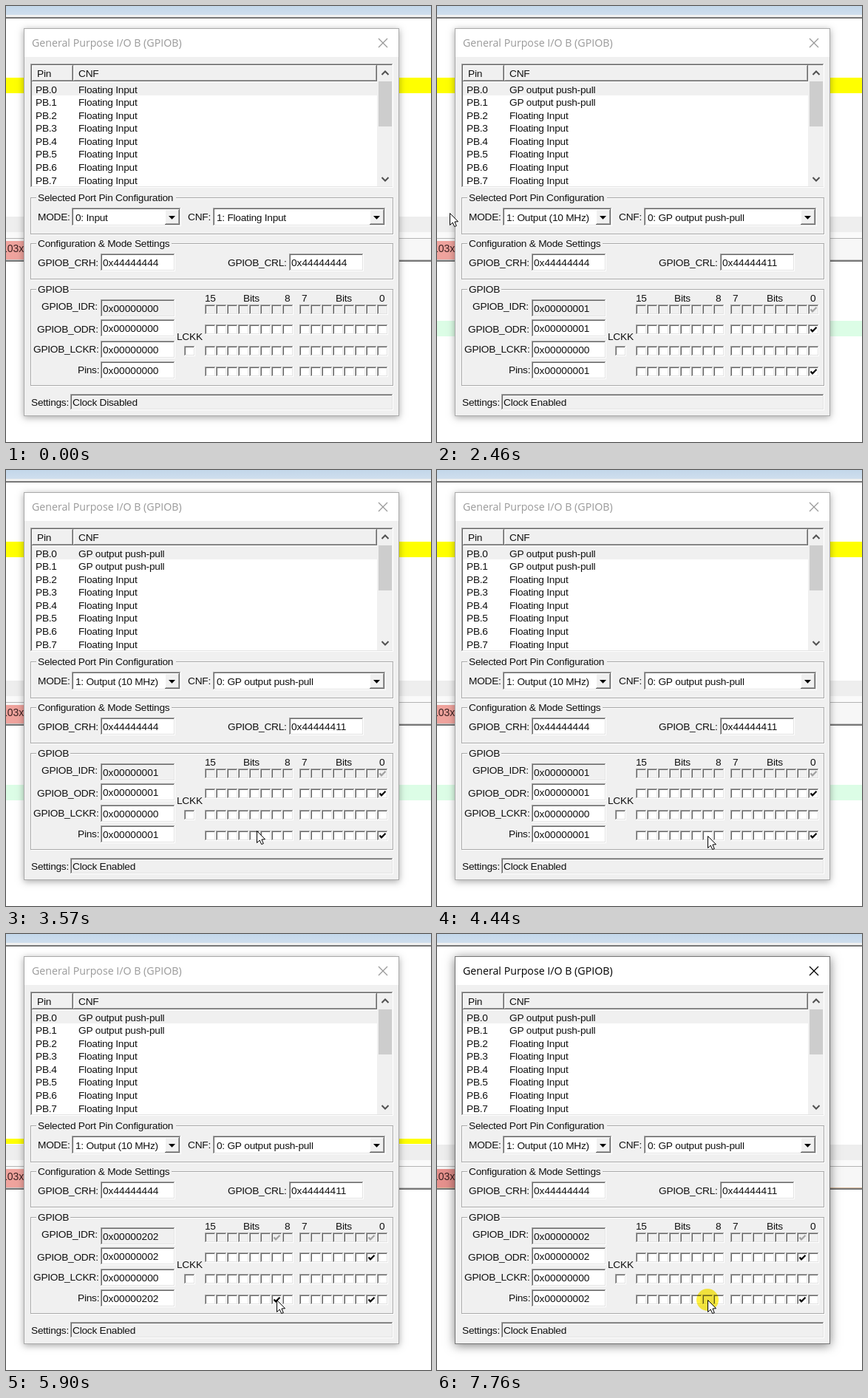
These frames come from a looping animation (575x590 px, 8 s). An HTML page with a canvas:

```html
<!DOCTYPE html>
<html lang="en">
<head>
<meta charset="utf-8">
<title>GPIO peripheral dialog</title>
<style>
html, body { margin: 0; width: 100%; height: 100%; overflow: hidden; background: #fff; }
canvas { display: block; }
</style>
</head>
<body>
<canvas id="stage" width="575" height="590"></canvas>
<script>
const LOOP = 8000;
const FACE = '#f0f0f0';
const ctx = document.getElementById('stage').getContext('2d');

function rect(x, y, w, h, color) {
  ctx.fillStyle = color;
  ctx.fillRect(x, y, w, h);
}

function write(str, x, y, { color = '#111', size = 13.7, gap = -0.25, family = '"Liberation Sans", Arial, sans-serif' } = {}) {
  ctx.font = `${size}px ${family}`;
  ctx.letterSpacing = gap + 'px';
  ctx.fillStyle = color;
  ctx.fillText(str, x, y);
}

function line(points, color, width) {
  ctx.beginPath();
  points.forEach(([x, y], i) => i ? ctx.lineTo(x, y) : ctx.moveTo(x, y));
  ctx.strokeStyle = color;
  ctx.lineWidth = width;
  ctx.stroke();
}

function sunken(x, y, w, h, fill) {
  rect(x, y, w, h, '#fff');
  rect(x, y, w - 1, h - 1, '#a0a0a0');
  rect(x + 1, y + 1, w - 2, h - 2, '#e3e3e3');
  rect(x + 1, y + 1, w - 3, h - 3, '#696969');
  rect(x + 2, y + 2, w - 4, h - 4, fill);
}

function raised(x, y, w, h) {
  rect(x, y, w, h, '#696969');
  rect(x, y, w - 1, h - 1, '#fff');
  rect(x + 1, y + 1, w - 2, h - 2, '#a0a0a0');
  rect(x + 1, y + 1, w - 3, h - 3, FACE);
}

function group(label, y, h, labelWidth) {
  ctx.lineWidth = 1;
  ctx.strokeStyle = '#fff';
  ctx.strokeRect(34.5, y + 1.5, 490, h);
  ctx.strokeStyle = '#a8a8a8';
  ctx.strokeRect(33.5, y + 0.5, 490, h);
  rect(41, y - 2, labelWidth, 5, FACE);
  write(label, 43, y + 5);
}

function field(label, value, labelX, x, y, labelY, fill = '#fff') {
  write(label, labelX, labelY);
  sunken(x, y, 101, 24, fill);
  write(hex(value), x + 3, y + 17, { gap: 0 });
}

function hex(n) {
  return '0x' + n.toString(16).toUpperCase().padStart(8, '0');
}

function combo(str, x, w) {
  sunken(x, 273, w, 25, '#fff');
  write(str, x + 5, 291);
  const bx = x + w - 22;
  raised(bx, 275, 20, 21);
  ctx.beginPath();
  ctx.moveTo(bx + 5, 284);
  ctx.lineTo(bx + 14, 284);
  ctx.lineTo(bx + 9.5, 288.7);
  ctx.fillStyle = '#000';
  ctx.fill();
}

function box(x, y, fill, mark) {
  sunken(x, y, 15, 14, fill);
  if (mark) line([[x + 3.5, y + 6.5], [x + 6, y + 9.3], [x + 11.5, y + 3.8]], mark, 2.2);
}

function bitRow(y, value, { fill = '#fff', mark = '#000', pressed = -1 } = {}) {
  for (let bit = 15; bit >= 0; bit--) {
    const x = 269 + (15 - bit) * 15 + (bit < 8 ? 8 : 0);
    const down = bit === pressed;
    box(x, y, down ? FACE : fill, (value >> bit & 1) && (down ? '#963c14' : mark));
  }
}

function chevron(y, dir) {
  line([[508.5, y + 2 * dir], [513, y - 2.5 * dir], [517.5, y + 2 * dir]], '#505050', 2);
}

function stateAt(t) {
  const within = (a, b) => t >= a && t < b;
  const on = t >= 2060;
  const odr = on ? (t >= 5900 ? 2 : 1) : 0;
  return {
    on, odr,
    pins: odr | (within(5830, 7020) ? 0x200 : 0),
    active: within(5630, 5900) || t >= 6820,
    pressed: within(5630, 5830) || within(6820, 7020) || t >= 7760,
    statement: t < 5830 ? [97, 21] : within(5900, 7020) ? [277, 7] : null,
    caret: within(1860, 5630)
  };
}

// Pointer steps: sampled every 70 ms, resting between moves.
function pointerAt(t) {
  if (t >= 70 && t < 130) return [241, 522];
  if (t < 2460) return null;
  if (t < 2530) return [17, 280];
  if (t < 2800) return [30, 286];
  if (t < 2870) return [132, 354];
  if (t < 2940) return [223, 418];
  if (t < 3640) {
    const k = Math.min(9, Math.floor((t - 2940) / 70));
    const rest = (1 - k / 9) ** 2;
    return [Math.round(339 - 67 * rest), Math.round(488 - 36 * rest)];
  }
  if (t < 4230) {
    const k = Math.min(6, Math.floor((t - 3640) / 78) + 1);
    return [339 + Math.round(21 * k / 6), 488 + Math.round(7 * k / 6)];
  }
  const k = Math.min(4, Math.floor((t - 4230) / 70) + 1);
  return [360 + Math.round(6 * k / 4), 495];
}

function drawEditor(s) {
  rect(0, 0, 575, 590, '#fff');
  const sky = ctx.createLinearGradient(0, 0, 0, 12);
  sky.addColorStop(0, '#c3d7ea');
  sky.addColorStop(1, '#cfdeed');
  rect(0, 0, 575, 12, sky);
  rect(0, 12, 575, 4, '#f0f0f0');
  rect(0, 15, 575, 2, '#777');
  if (s.statement) rect(0, s.statement[0], 575, s.statement[1], '#ff0');
  if (s.caret) rect(0, 426, 575, 21, '#dcfde6');
  rect(0, 285, 575, 21, '#eee');
  rect(0, 306, 575, 8, '#fafafa');
  rect(0, 314, 575, 1, '#b4b4b4');
  rect(0, 315, 575, 28, '#f7f7f7');
  rect(0, 318, 25, 26, s.active ? '#e6918d' : '#efa39d');
  write('103x', -6, 333, { color: '#3a2020', size: 14, gap: 0 });
  rect(0, 343, 575, 1, s.active ? '#d8b89a' : '#c8c8c8');
  rect(0, 344, 575, 2, '#777');
}

function drawWindow(s) {
  ctx.save();
  ctx.shadowColor = s.active ? 'rgba(0,0,0,.5)' : 'rgba(0,0,0,.35)';
  ctx.shadowBlur = s.active ? 13 : 9;
  ctx.shadowOffsetY = 2;
  rect(24, 30, 508, 525, s.active ? '#777' : '#aaa');
  ctx.restore();
  rect(25, 31, 506, 38, '#fff');
  rect(25, 69, 506, 485, FACE);
  const ink = s.active ? '#000' : '#999';
  write('General Purpose I/O B (GPIOB)', 35, 55, { color: ink, size: 14.2, gap: 0, family: '"Open Sans", "Noto Sans", sans-serif' });
  line([[504, 44], [516, 56]], ink, 1.2);
  line([[516, 44], [504, 56]], ink, 1.2);
}

function drawList(s) {
  sunken(33, 78, 491, 168, '#fff');
  raised(35, 80, 56, 22);
  raised(91, 80, 411, 22);
  write('Pin', 42, 96);
  write('CNF', 98, 96);
  rect(35, 104, 467, 17, FACE);
  for (let i = 0; i < 8; i++) {
    const y = 117.6 + i * 17.57;
    write('PB.' + i, 40, y);
    write(s.on && i < 2 ? 'GP output push-pull' : 'Floating Input', 98, y);
  }
  rect(502, 80, 21, 164, FACE);
  rect(504, 102, 18, 61, '#cdcdcd');
  chevron(91, 1);
  chevron(234, -1);
}

function drawRegisters(s) {
  group('Selected Port Pin Configuration', 259, 49, 189);
  write('MODE:', 43, 290);
  combo(s.on ? '1: Output (10 MHz)' : '0: Input', 89, 148);
  write('CNF:', 246, 290);
  combo(s.on ? '0: GP output push-pull' : '1: Floating Input', 280, 234);

  group('Configuration & Mode Settings', 321, 48, 183);
  field('GPIOB_CRH:', 0x44444444, 43, 128, 335, 352);
  field('GPIOB_CRL:', s.on ? 0x44444411 : 0x44444444, 300, 383, 335, 352);

  group('GPIOB', 383, 130, 46);
  field('GPIOB_IDR:', s.pins, 48, 128, 397, 411, FACE);
  field('GPIOB_ODR:', s.odr, 42, 128, 424, 442);
  field('GPIOB_LCKR:', 0, 37, 128, 453, 469);
  field('Pins:', s.pins, 97, 128, 481, 497);
  write('LCKK', 231, 452);
  box(241, 460, '#fff');

  [['15', 269], ['Bits', 321], ['8', 377], ['7', 400], ['Bits', 446], ['0', 505]]
    .forEach(([str, x]) => write(str, x, 400));
  bitRow(404, s.pins, { fill: FACE, mark: '#a0a0a0' });
  bitRow(431, s.odr);
  bitRow(460, 0);
  bitRow(488, s.pins, { pressed: s.pressed ? 9 : -1 });

  write('Settings:', 34, 541);
  sunken(87, 525, 437, 22, FACE);
  write(s.on ? 'Clock Enabled' : 'Clock Disabled', 90, 541);
}

function drawPointer(pos, pressed) {
  if (pressed) {
    ctx.save();
    ctx.globalCompositeOperation = 'multiply';
    ctx.beginPath();
    ctx.arc(366, 495, 15, 0, Math.PI * 2);
    ctx.fillStyle = '#fff040';
    ctx.fill();
    ctx.restore();
  }
  if (!pos) return;
  ctx.save();
  ctx.translate(pos[0] + 0.5, pos[1] + 0.5);
  ctx.beginPath();
  [[0, 0], [0, 16], [3.7, 12.5], [6.2, 18], [8.8, 17], [6.4, 11.5], [11, 11.2]]
    .forEach(([x, y]) => ctx.lineTo(x, y));
  ctx.closePath();
  ctx.fillStyle = '#fff';
  ctx.fill();
  ctx.strokeStyle = '#000';
  ctx.lineWidth = 1;
  ctx.stroke();
  ctx.restore();
}

function draw(t) {
  const s = stateAt(t);
  drawEditor(s);
  drawWindow(s);
  drawList(s);
  drawRegisters(s);
  drawPointer(pointerAt(t), s.pressed);
}

const start = performance.now();
function tick() {
  draw((performance.now() - start) % LOOP);
  requestAnimationFrame(tick);
}
tick();
</script>
</body>
</html>
```
